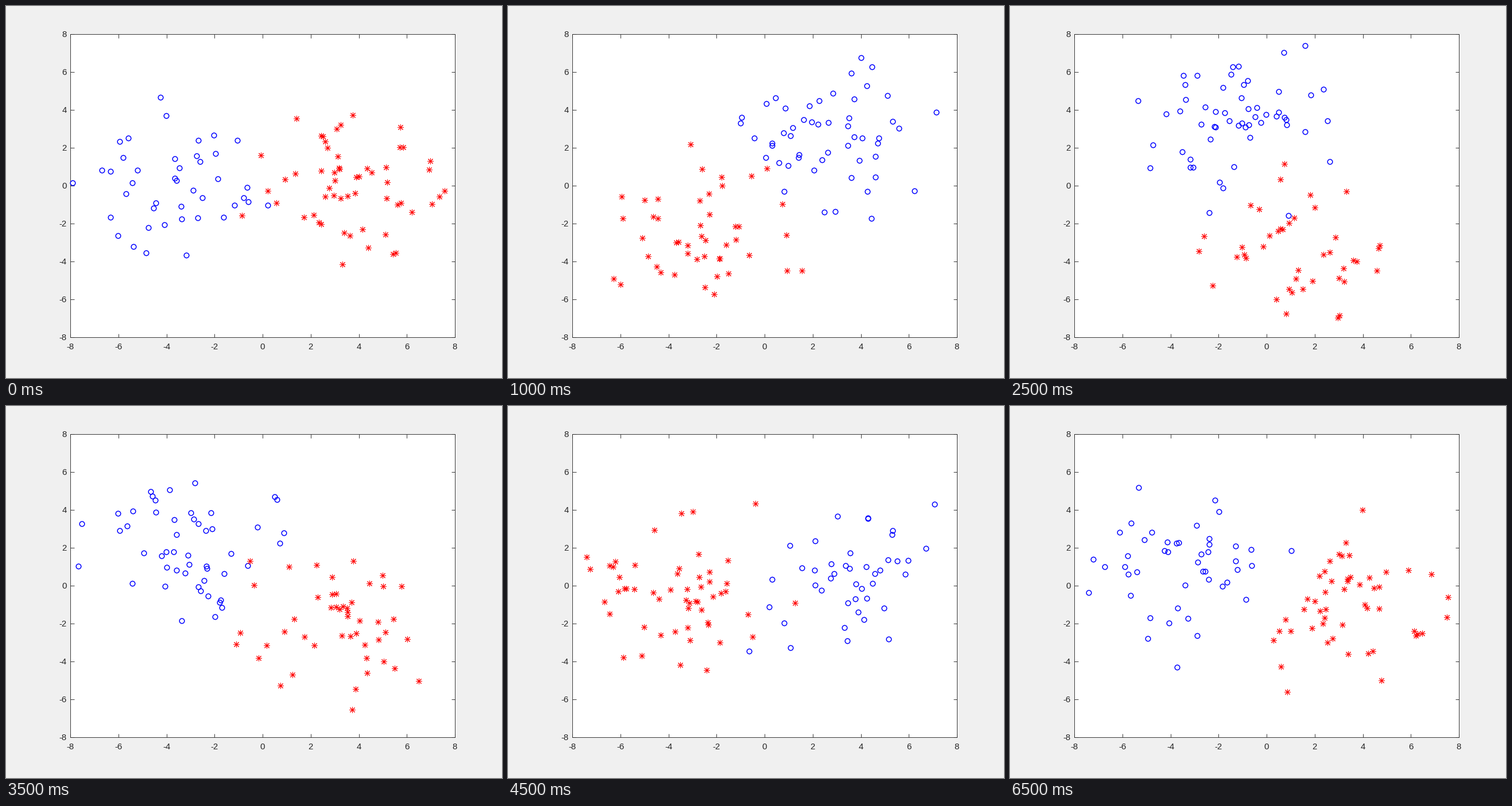
These frames come from a looping animation (864 px wide and 648 px high, 7 s). A matplotlib script:

```python
import numpy as np
import matplotlib.pyplot as plt
from matplotlib.animation import FuncAnimation

W, H, DPI = 864, 648, 72
LIM = 8
RADIUS = 3.7     # distance of each class centre from the origin
SPREAD = 1.9     # standard deviation within a class
TOTAL = 98       # points per draw, both classes together
INK = "#262626"

# Direction of the blue centre at each step, in degrees; red lies opposite
ANGLES = [180, 70, 44, 10, 38, 110, 170, 147, 130, 7, 30, 105, 15, 164]


def cloud(rng, n, centre):
    """Gaussian class around centre, without far outliers."""
    pts = rng.normal(size=(4 * n, 2))
    pts = pts[np.hypot(*pts.T) < 2.6][:n]
    pts = (pts - pts.mean(axis=0)) / pts.std(axis=0)
    pts = centre + SPREAD * pts
    return pts[np.abs(pts).max(axis=1) <= LIM]


def sample(step):
    rng = np.random.default_rng(100 + step)
    a = np.radians(ANGLES[step])
    centre = RADIUS * np.array([np.cos(a), np.sin(a)])
    n = round(42 + 15 * np.sin(a))
    return cloud(rng, n, centre), cloud(rng, TOTAL - n, -centre)


plt.rcParams.update({
    "font.family": "Liberation Sans",
    "font.size": 15,
    "axes.unicode_minus": False,
})
fig = plt.figure(figsize=(W / DPI, H / DPI), dpi=DPI, facecolor="#f0f0f0")
ax = fig.add_axes([0.13, 0.11, 0.775, 0.815])
ticks = range(-LIM, LIM + 1, 2)
ax.set(xlim=(-LIM, LIM), ylim=(-LIM, LIM), xticks=ticks, yticks=ticks)
ax.tick_params(direction="in", top=True, right=True, length=6.5, width=0.9,
               color=INK, labelcolor=INK)
ax.tick_params(axis="x", pad=10)
ax.tick_params(axis="y", pad=6.5)
for spine in ax.spines.values():
    spine.set(linewidth=0.9, color=INK)

style = dict(ls="none", clip_on=False, zorder=5)
blue, = ax.plot([], [], marker="o", ms=8.6, mfc="none", mec="#0000ff",
                mew=1.5, **style)
red, = ax.plot([], [], marker=(8, 2, 0), ms=11, mec="#ff0000", mew=1.0,
               **style)


def draw(step):
    for line, pts in zip((blue, red), sample(step)):
        line.set_data(*pts.T)
    return blue, red


anim = FuncAnimation(fig, draw, frames=len(ANGLES), interval=500,
                     repeat=True, repeat_delay=0)
plt.show()
```
